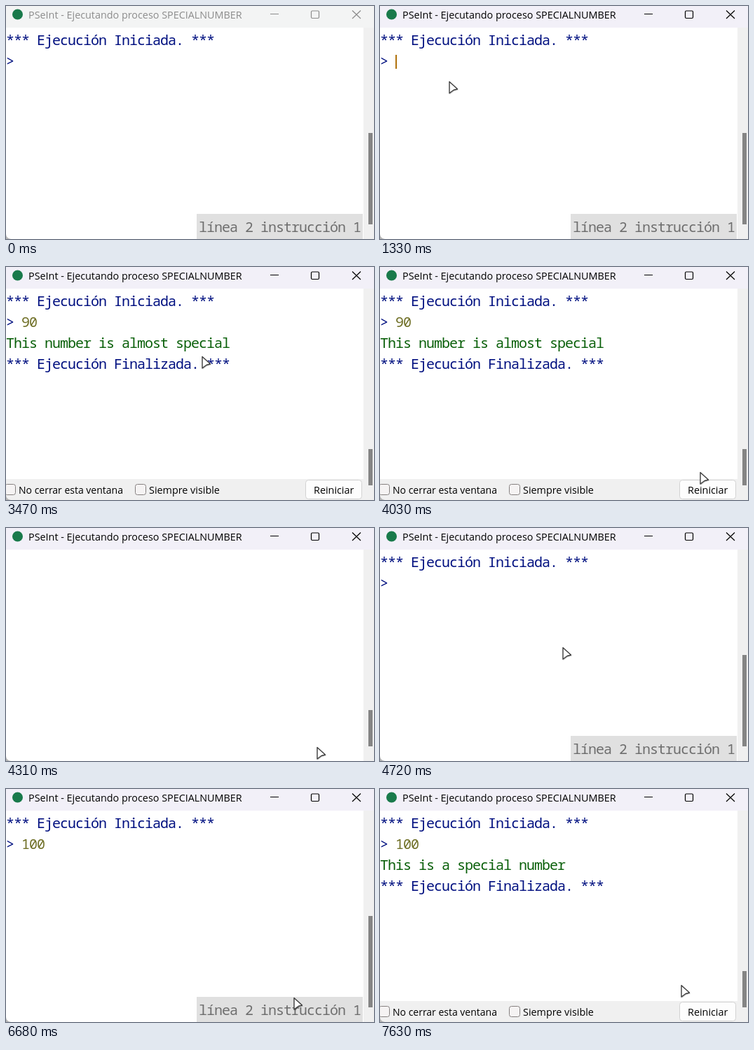
An HTML page for the animation above (8 s loop, 525 by 334 pixels).

```html
<!DOCTYPE html>
<html lang="es">
<head>
<meta charset="utf-8">
<title>Consola</title>
<style>
html, body { margin: 0; width: 100%; height: 100%; overflow: hidden; background: #fff; }
svg { display: block; width: 525px; height: 334px; }
text { white-space: pre; }
.ui { font: 14.37px "Open Sans", "Noto Sans", sans-serif; }
.small { font-size: 14px; }
.mono { font: 20px "Noto Sans Mono", "Liberation Mono", monospace; letter-spacing: -1px; }
.sys { fill: #001080; }
.in { fill: #6e6e24; }
.out { fill: #0a600a; }

/* One shared 8 s clock; everything changes in hard steps */
.anim { animation: 8s step-end infinite; }

.title { animation-name: title; }
.frame { animation-name: frame; }
.prompt { animation-name: prompt; }
.status { animation-name: status; }
.bar { animation-name: bar; }
.run1 { animation-name: run1; }
.run2 { animation-name: run2; }
.a1 { animation-name: a1; }
.a2 { animation-name: a2; }
.b1 { animation-name: b1; }
.b2 { animation-name: b2; }
.b3 { animation-name: b3; }
.thumb { animation-name: thumb; }
.button { animation-name: button; }
.caret { animation-name: caret; }
.pointer { animation-name: pointer; }

@keyframes title { 0% { color: #8c8c8c; } 4.82%, 100% { color: #000; } }
@keyframes frame { 0% { fill: #f3f4f4; } 4.82%, 100% { fill: #f2f0f8; } }
@keyframes prompt { 0%, 55.57%, 100% { opacity: 1; } 53.82% { opacity: 0; } }
@keyframes status { 0%, 56.45% { opacity: 1; } 26.57%, 95.32%, 100% { opacity: 0; } }
@keyframes bar { 0%, 53.82% { opacity: 0; } 26.57%, 95.32%, 100% { opacity: 1; } }
@keyframes run1 { 0%, 53.82%, 100% { opacity: 0; } 26.57% { opacity: 1; } }
@keyframes run2 { 0% { opacity: 0; } 94.45%, 100% { opacity: 1; } }
@keyframes a1 { 0%, 53.82%, 100% { opacity: 0; } 19.07% { opacity: 1; } }
@keyframes a2 { 0%, 53.82%, 100% { opacity: 0; } 19.95% { opacity: 1; } }
@keyframes b1 { 0% { opacity: 0; } 68.95%, 100% { opacity: 1; } }
@keyframes b2 { 0% { opacity: 0; } 72.2%, 100% { opacity: 1; } }
@keyframes b3 { 0% { opacity: 0; } 73.95%, 100% { opacity: 1; } }
@keyframes thumb {
  0%, 56.45% { y: 182px; height: 131px; }
  26.57%, 95.32%, 100% { y: 261px; height: 52px; }
}
@keyframes button {
  0%, 53.82%, 100% { fill: #fdfdfd; stroke: #d2d2d2; }
  51.2% { fill: #e0eef9; stroke: #0078d4; }
}
@keyframes caret {
  0%, 10.82% { opacity: 0; translate: 0; }
  4.82%, 16.57% { opacity: 1; translate: 0; }
  19.07% { opacity: 1; translate: 11px; }
  19.95% { opacity: 1; translate: 22px; }
  22.45% { opacity: 0; translate: 22px; }
  59.95% { opacity: 1; translate: 0; }
  66.57% { opacity: 0; translate: 0; }
  73.07% { opacity: 1; translate: 22px; }
  73.95%, 85.2% { opacity: 1; translate: 33px; }
  78.95%, 91.95%, 100% { opacity: 0; translate: 33px; }
}
/* steps(n) moves the pointer once every 70 ms between waypoints */
@keyframes pointer {
  0% { translate: 300px 345px; }
  1.32% { translate: 290px 324px; animation-timing-function: steps(3); }
  3.95% { translate: 205px 262px; animation-timing-function: steps(3); }
  6.57% { translate: 131px 207px; animation-timing-function: steps(2); }
  8.32% { translate: 104px 170px; animation-timing-function: steps(2); }
  10.07% { translate: 98px 108px; }
  43.32% { translate: 279px 128px; animation-timing-function: steps(3); }
  45.95% { translate: 432px 170px; animation-timing-function: steps(3); }
  48.57% { translate: 474px 230px; animation-timing-function: steps(2); }
  50.32% { translate: 456px 294px; animation-timing-function: steps(2); }
  52.07% { translate: 443px 314px; }
  53.82% { translate: 443px 314px; animation-timing-function: steps(2); }
  55.57% { translate: 396px 266px; animation-timing-function: steps(2); }
  57.32% { translate: 335px 222px; animation-timing-function: steps(2); }
  58.95% { translate: 260px 171px; animation-timing-function: steps(2); }
  60.7% { translate: 229px 158px; animation-timing-function: steps(2); }
  62.45% { translate: 216px 144px; }
  64.07% { translate: 201px 134px; }
  81.7% { translate: 262px 176px; animation-timing-function: steps(2); }
  83.45% { translate: 410px 299px; animation-timing-function: steps(2); }
  85.2% { translate: 436px 308px; animation-timing-function: steps(4); }
  88.7%, 100% { translate: 429px 281px; }
}
</style>
</head>
<body>
<svg viewBox="0 0 525 334">
  <rect width="525" height="334" fill="#fff"/>

  <!-- Title bar -->
  <rect class="anim frame" width="525" height="31"/>
  <circle cx="16.5" cy="12" r="7.5" fill="#197a4b"/>
  <g class="anim title" fill="none" stroke="currentColor" stroke-width="1.2">
    <text class="ui" x="32" y="18" fill="currentColor" stroke="none">PSeInt - Ejecutando proceso SPECIALNUMBER</text>
    <path d="M377 11.5H389M494 6.500L506 18M506 6.500L494 18"/>
    <rect x="435.5" y="7" width="11" height="10.5" rx="1.5"/>
  </g>

  <!-- Scrollbar -->
  <rect x="510" y="31" width="15" height="303" fill="#f0f0f0"/>

  <!-- Console -->
  <g class="mono">
    <g class="anim prompt sys">
      <text x="0" y="56">*** Ejecución Iniciada. ***</text>
      <text x="0" y="86">&gt;</text>
    </g>
    <g class="in">
      <text class="anim a1" x="22" y="86">9</text>
      <text class="anim a2" x="33" y="86">0</text>
      <text class="anim b1" x="22" y="86">1</text>
      <text class="anim b2" x="33" y="86">0</text>
      <text class="anim b3" x="44" y="86">0</text>
    </g>
    <g class="anim run1">
      <text class="out" x="0" y="116">This number is almost special</text>
      <text class="sys" x="0" y="146">*** Ejecución Finalizada. ***</text>
    </g>
    <g class="anim run2">
      <text class="out" x="0" y="116">This is a special number</text>
      <text class="sys" x="0" y="146">*** Ejecución Finalizada. ***</text>
    </g>
    <g class="anim status">
      <rect x="272" y="298" width="237" height="36" fill="#e0e0e0"/>
      <text x="275" y="324" fill="#6e6e6e">línea 2 instrucción 1</text>
    </g>
  </g>
  <rect class="anim caret" x="22" y="70" width="2" height="20" fill="#b0720c"/>

  <!-- Bottom bar -->
  <g class="anim bar ui">
    <rect y="304" width="525" height="30" fill="#f0f0f0"/>
    <g fill="#f5f3f3" stroke="#85807f">
      <rect x="-1.5" y="311.5" width="15" height="15" rx="3"/>
      <rect x="184.5" y="311.5" width="15" height="15" rx="3"/>
    </g>
    <rect class="anim button" x="427.5" y="305.5" width="80" height="27" rx="4"/>
    <text class="small" x="18" y="325">No cerrar esta ventana</text>
    <text x="204" y="325">Siempre visible</text>
    <text x="439" y="325">Reiniciar</text>
  </g>
  <rect class="anim thumb" x="517" width="6" fill="#858585"/>
  <path d="M0 327Q0.5 333 7 334H0Z" fill="#b5b5b5"/>

  <g class="anim pointer" stroke-linejoin="round">
    <path d="M1.5 2L14 12.5L8 14L1.5 19Z" fill="#000" opacity=".2"/>
    <path d="M1 0.5L12.5 11L7 12.5L1 17Z" fill="#fff" stroke="#3c3c3c" stroke-width="1.4"/>
  </g>
</svg>
</body>
</html>
```
